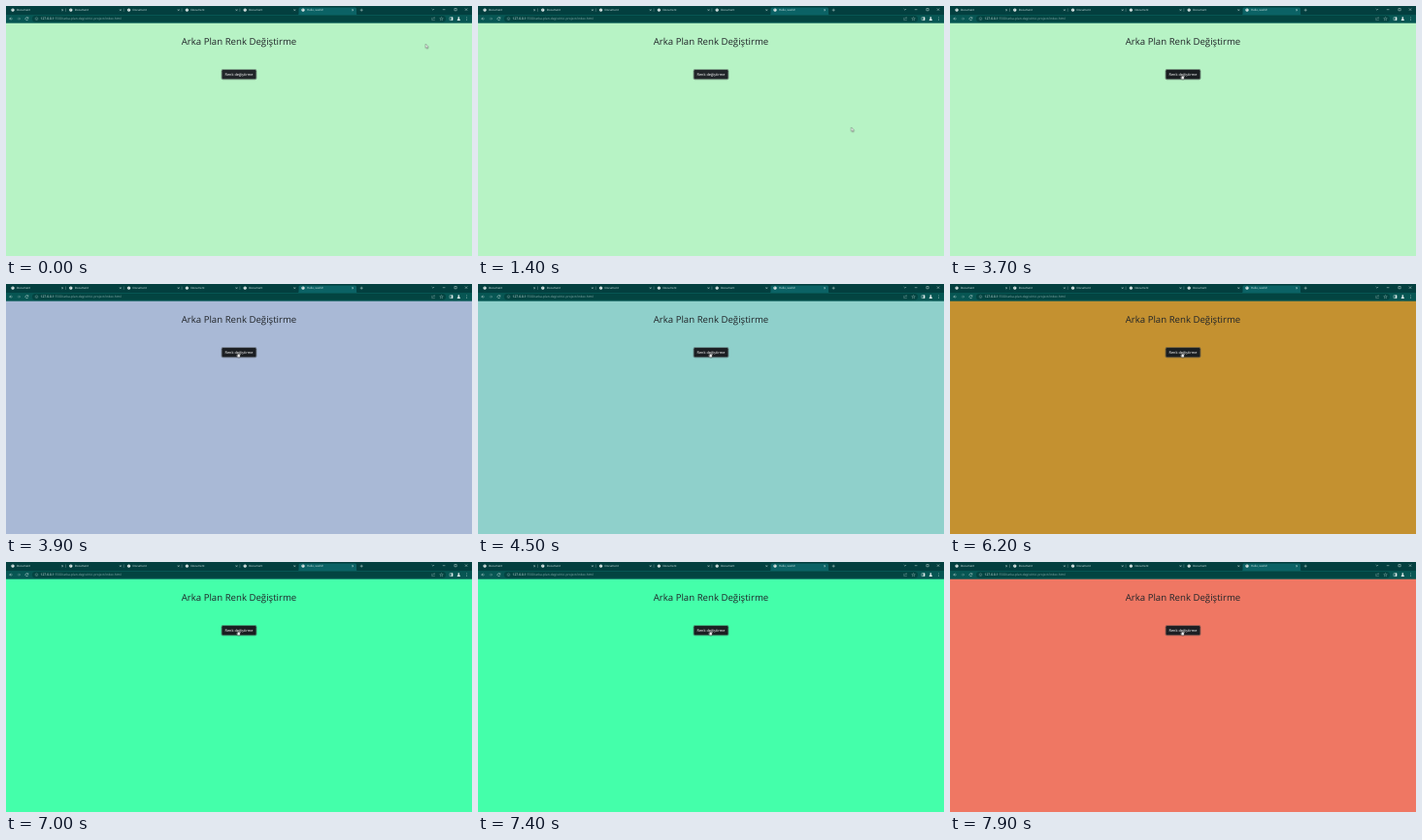
Write an HTML page that moves like this. It is 480 px wide and 258 px high and loops after 8000 ms.

```html
<!DOCTYPE html>
<html lang="tr">
<head>
<meta charset="utf-8">
<title>Arka Plan Renk Değiştirme</title>
<style>
html, body { margin: 0; width: 100%; height: 100%; overflow: hidden; }
svg { display: block; width: 100vw; height: 100vh; }
text { font-family: "Open Sans", "Noto Sans", sans-serif; text-rendering: geometricPrecision; }
.small { font-size: 2.9px; fill: #dcebea; }
.line { fill: none; stroke: #d5e6e5; stroke-width: .45; }
.dim { opacity: .55; }
</style>
</head>
<body>
<svg viewBox="0 0 480 258" xmlns="http://www.w3.org/2000/svg">
  <rect id="page" width="480" height="258" fill="#b7f3c5"/>

  <rect width="480" height="9.2" fill="#033f3f"/>
  <path d="M300 9.2q1.5 0 1.5-1.5V3q0-1.5 1.5-1.5h56.500q1.500 0 1.500 1.500v4.700q0 1.500 1.500 1.500z" fill="#0b6265"/>
  <rect y="9" width="480" height="8.700" fill="#075653"/>
  <rect x="27" y="9.900" width="426" height="6.600" rx="3.300" fill="#034441"/>
  <g id="tabs"></g>
  <path class="line" d="M364.700 4.200h3M366.200 2.700v3M438.700 3l1.200 1.200 1.200-1.200M449.800 3.700h2.600M461.900 2.500h2.300v2.300h-2.300zM472.900 2.500l2.300 2.300m0-2.300l-2.300 2.300"/>

  <path class="line" d="M6.700 13.100h-3m1.400-1.400l-1.400 1.400 1.400 1.400"/>
  <path class="line dim" d="M11.600 13.100h3m-1.400-1.400l1.400 1.400-1.400 1.400"/>
  <path class="line" d="M22.700 12.300a1.500 1.500 0 1 0 .2 1.300M22.900 11.300v1.300h-1.300"/>
  <circle class="line dim" cx="31.500" cy="13.100" r="1.400"/>
  <path class="line dim" d="M31.500 12.800v1.100"/>
  <text x="35.600" y="14.300" font-size="3.300" fill="#e9f3f2">127.0.0.1<tspan fill="#86aaa8">:5500/arka-plan-degistirici-project/index.html</tspan></text>
  <path class="line dim" d="M439.500 12.300h-.8v2.300h2.700v-.8M439.700 13.500q.2-1.400 2-1.400m-.8-.8l.8.800-.8.800"/>
  <path class="line dim" d="M448.500 11.400l.5 1.200 1.300.1-1 .8.300 1.300-1.100-.7-1.100.7.300-1.300-1-.8 1.300-.1z"/>
  <path class="line" d="M457 11.700h3v2.900h-3z"/>
  <path d="M458.700 11.500h1.500v3.300h-1.500z" fill="#e4efee"/>
  <g fill="#e4efee">
    <circle cx="466.300" cy="12.100" r=".9"/>
    <path d="M464.600 15q.3-2 1.700-2t1.700 2z"/>
    <circle cx="474.500" cy="11.800" r=".35"/>
    <circle cx="474.500" cy="13.100" r=".35"/>
    <circle cx="474.500" cy="14.400" r=".35"/>
  </g>

  <text x="240" y="39.600" text-anchor="middle" font-size="9.650" font-weight="500" fill="#212529">Arka Plan Renk Değiştirme</text>
  <rect id="ring" x="221.600" y="65.100" width="36.800" height="11.100" rx="1.800" fill="#424649" fill-opacity=".5"/>
  <rect id="button" x="222.500" y="66" width="35" height="9.300" rx="1.200" fill="#212529"/>
  <text x="240" y="72.100" text-anchor="middle" font-size="3.850" fill="#fff">Renk değiştirme</text>

  <g id="cursor">
    <path id="arrow" d="M0 0v4.300l1-.9.700 1.600.7-.3-.7-1.500h1.400z" fill="#fff" stroke="#222" stroke-width=".35"/>
    <path id="hand" d="M-.4.400q.4-.7.800 0v1.500l1.500.4q.5.200.4.800l-.4 1.900h-2.200l-1.500-1.900q.2-.6.800-.2l.6.500z" fill="#fff" stroke="#222" stroke-width=".3"/>
  </g>
</svg>
<script>
const LOOP = 8000;
const byId = id => document.getElementById(id);

// Plays a table of [ms, value] as hard steps.
function hold(id, property, steps) {
  const frames = steps.map(([ms, value]) =>
    ({ offset: ms / LOOP, [property]: value, easing: "step-end" }));
  frames.push({ offset: 1, [property]: steps.at(-1)[1] });
  byId(id).animate(frames, { duration: LOOP, iterations: Infinity });
}

byId("tabs").innerHTML = [0, 1, 2, 3, 4, 5].map(i => {
  const x = i * 59.8;
  return `<circle cx="${x + 7}" cy="4.100" r="1.700" fill="#edf5f4"/>
    <path d="M${x + 6} 3.400l1.100.4-.3.900m.8-1.700l.5.700" fill="none" stroke="#33615f" stroke-width=".4"/>
    <text class="small" x="${x + 11}" y="5.200">${i < 5 ? "Document" : "Hello, world!"}</text>
    <path class="line" d="M${x + 57.2} 3.300l1.800 1.800m0-1.800l-1.800 1.800"/>
    ${i < 4 ? `<path class="line dim" d="M${x + 61.5} 2.500v3.300" opacity=".4"/>` : ""}`;
}).join("");

const path = [
  [0, 432.2, 39.2], [100, 430, 41], [200, 424.5, 42.5], [400, 384.5, 81.5],
  [1400, 384.5, 125.2], [2100, 383, 128], [2200, 362, 128.5], [2300, 318, 125],
  [2400, 272, 119], [2800, 243, 69], [3300, 239, 70.5]
];
hold("cursor", "transform", path.map(([ms, x, y]) => [ms, `translate(${x}px, ${y}px)`]));
hold("arrow", "opacity", [[0, 1], [2800, 0]]);
hold("hand", "opacity", [[0, 0], [2800, 1]]);

const clicks = [
  [3700, "#a9b9d6"], [4300, "#8fd0cb"], [5200, "#c49130"],
  [6200, "#8d79b8"], [6900, "#44ffaa"], [7600, "#ef7763"]
];
hold("page", "fill", [[0, "#b7f3c5"], ...clicks.map(([ms, color]) => [ms + 100, color])]);
hold("button", "fill", [[0, "#212529"], [2800, "#1c1f23"],
  ...clicks.flatMap(([ms]) => [[ms, "#1a1e21"], [ms + 200, "#1c1f23"]])]);
hold("ring", "fillOpacity", [[0, .5],
  ...clicks.flatMap(([ms]) => [[ms, .6], [ms + 200, .5]])]);
</script>
</body>
</html>
```
